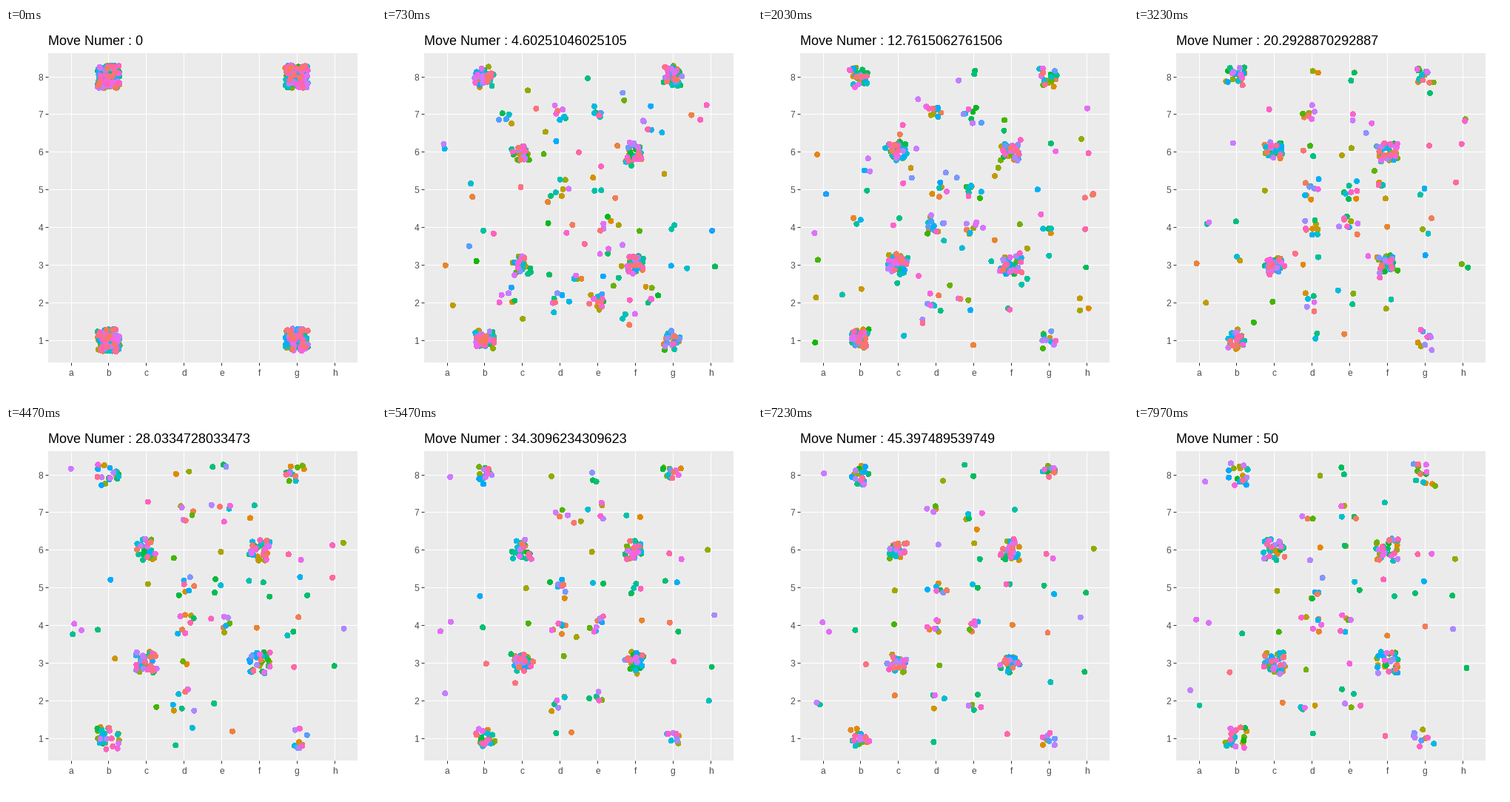
These frames come from a looping animation (500x500 px, 10000 ms). A matplotlib script:

```python
import numpy as np
import matplotlib.pyplot as plt
from matplotlib.animation import FuncAnimation
from matplotlib.patches import Rectangle

SIZE, DPI = 500, 100
PX = 72 / DPI
GAMES, MOVES = 120, 50
STEPS, STEP_MS = 240, 100 / 3
LOOP_MS, TICK_MS = 10000, 20
LEFT, TOP, SIDE = 57, 34, 418
RIGHT, BOTTOM = LEFT + SIDE, TOP + SIDE
CELL = 356 / 7
GREY = "#4D4D4D"

# Home square: share that never leaves, and how many moves the rest wait.
HOMES = {(2, 1): (.18, 9), (7, 1): (.07, 3), (2, 8): (.16, 5), (7, 8): (.12, 4)}

rng = np.random.default_rng(12)


def screen_x(file):
    return 87.55 + CELL * (file - 1)


def screen_y(rank):
    return 421.6 - CELL * (rank - 1)


def appeal(square):
    """How much knights like to land on a square."""
    file, rank = square
    if file in (3, 6) and rank in (3, 6):
        return 8
    if file in (4, 5) and rank in (2, 4, 5, 7):
        return 2.6
    if square in HOMES:
        return 0.2
    return 0.6 if file in (1, 8) or rank in (1, 8) else 1


def jump(square):
    x, y = square
    options = [(a, b) for a in range(1, 9) for b in range(1, 9)
               if abs((a - x) * (b - y)) == 2]
    weights = np.array([appeal(s) for s in options])
    return options[rng.choice(len(options), p=weights / weights.sum())]


def simulate():
    """Square and presence of every knight after each move."""
    homes = list(HOMES) * GAMES
    squares = list(homes)
    count = len(homes)
    ranks = np.array([rng.permutation(GAMES) for _ in HOMES]).T.ravel()
    patience = (ranks + 0.5) / GAMES
    left_home = np.zeros(count, bool)
    alive = np.ones(count, bool)
    path, presence = [list(squares)], [alive.copy()]
    for move in range(1, MOVES + 1):
        rate = 0.35 * np.exp(-move / 11)
        for k in range(count):
            if left_home[k]:
                restless = 0.5 if appeal(squares[k]) == 8 else 1.35
                if rng.random() < rate * restless:
                    squares[k] = jump(squares[k])
            else:
                settled, wait = HOMES[homes[k]]
                if patience[k] > settled + (1 - settled) * np.exp(-move / wait):
                    left_home[k] = True
                    squares[k] = jump(squares[k])
        share = 0.55 + 0.45 * np.exp(-(move / 20) ** 2)
        captured = int(alive.sum() - round(share * count))
        if captured > 0:
            alive[rng.choice(np.flatnonzero(alive & left_home),
                             captured, replace=False)] = False
        path.append(list(squares))
        presence.append(alive.copy())
    return np.array(path, float), np.array(presence)


def hue_colors(hue, chroma=100, light=65):
    """Evenly bright colours: polar LUV hues (degrees) to sRGB."""
    angle = np.radians(hue)
    u = chroma * np.cos(angle) / (13 * light) + 0.1978
    v = chroma * np.sin(angle) / (13 * light) + 0.4683
    y = np.full_like(u, ((light + 16) / 116) ** 3)
    x = y * 9 * u / (4 * v)
    z = y * (12 - 3 * u - 20 * v) / (4 * v)
    linear = np.clip([3.2406 * x - 1.5372 * y - 0.4986 * z,
                      -0.9689 * x + 1.8758 * y + 0.0415 * z,
                      0.0557 * x - 0.2040 * y + 1.0570 * z], 0, 1)
    return np.where(linear > 0.0031308,
                    1.055 * linear ** (1 / 2.4) - 0.055, 12.92 * linear).T


board, present = simulate()
board += rng.uniform(-0.3, 0.3, board.shape)
track = np.stack([screen_x(board[..., 0]), screen_y(board[..., 1])], axis=-1)
hues = 25 + 360 * np.arange(GAMES) / GAMES
colors = np.repeat(hue_colors(hues), len(HOMES), axis=0)

plt.rcParams["font.family"] = "Liberation Sans"
fig = plt.figure(figsize=(SIZE / DPI, SIZE / DPI), dpi=DPI, facecolor="white")
ax = fig.add_axes([0, 0, 1, 1])
ax.axis("off")

ax.add_patch(Rectangle((LEFT, TOP), SIDE, SIDE, color="#EBEBEB", lw=0))
numbers = np.arange(1, 9)
xs, ys = screen_x(numbers), screen_y(numbers)
ax.vlines(xs, TOP, BOTTOM, color="white", lw=PX)
ax.hlines(ys, LEFT, RIGHT, color="white", lw=PX)
ax.vlines(xs, BOTTOM, BOTTOM + 4, color="#333333", lw=PX)
ax.hlines(ys, LEFT - 4, LEFT, color="#333333", lw=PX)
for n, x, y in zip(numbers, xs, ys):
    ax.text(x + 0.5, 470, "abcdefgh"[n - 1], size=12 * PX, color=GREY, ha="center")
    ax.text(50, y + 5, str(n), size=12 * PX, color=GREY, ha="right")

title = ax.text(57, 23, "", size=18 * PX, color="black")
dots = ax.scatter(track[0, :, 0], track[0, :, 1], s=(7 * PX) ** 2, c=colors,
                  linewidths=0, antialiaseds=False, zorder=3)
ax.set(xlim=(0, SIZE), ylim=(SIZE, 0))


def draw(frame):
    # Steps begin on whole hundredths of a second, so look just past mid-tick.
    clock = frame * TICK_MS + TICK_MS / 2 + 3.4
    step = min(int(clock / STEP_MS), STEPS - 1)
    time = MOVES * step / (STEPS - 1)
    now = int(time)
    after = min(now + 1, MOVES)
    part = time - now
    spots = track[now] + part * (track[after] - track[now])
    shown = present[now] if part == 0 else present[after]
    dots.set_offsets(np.where(shown[:, None], spots, -50))
    title.set_text(f"Move Numer : {time:.15g}")
    return dots, title


anim = FuncAnimation(fig, draw, frames=LOOP_MS // TICK_MS, interval=TICK_MS,
                     repeat=True, repeat_delay=0, blit=False)
plt.show()
```
